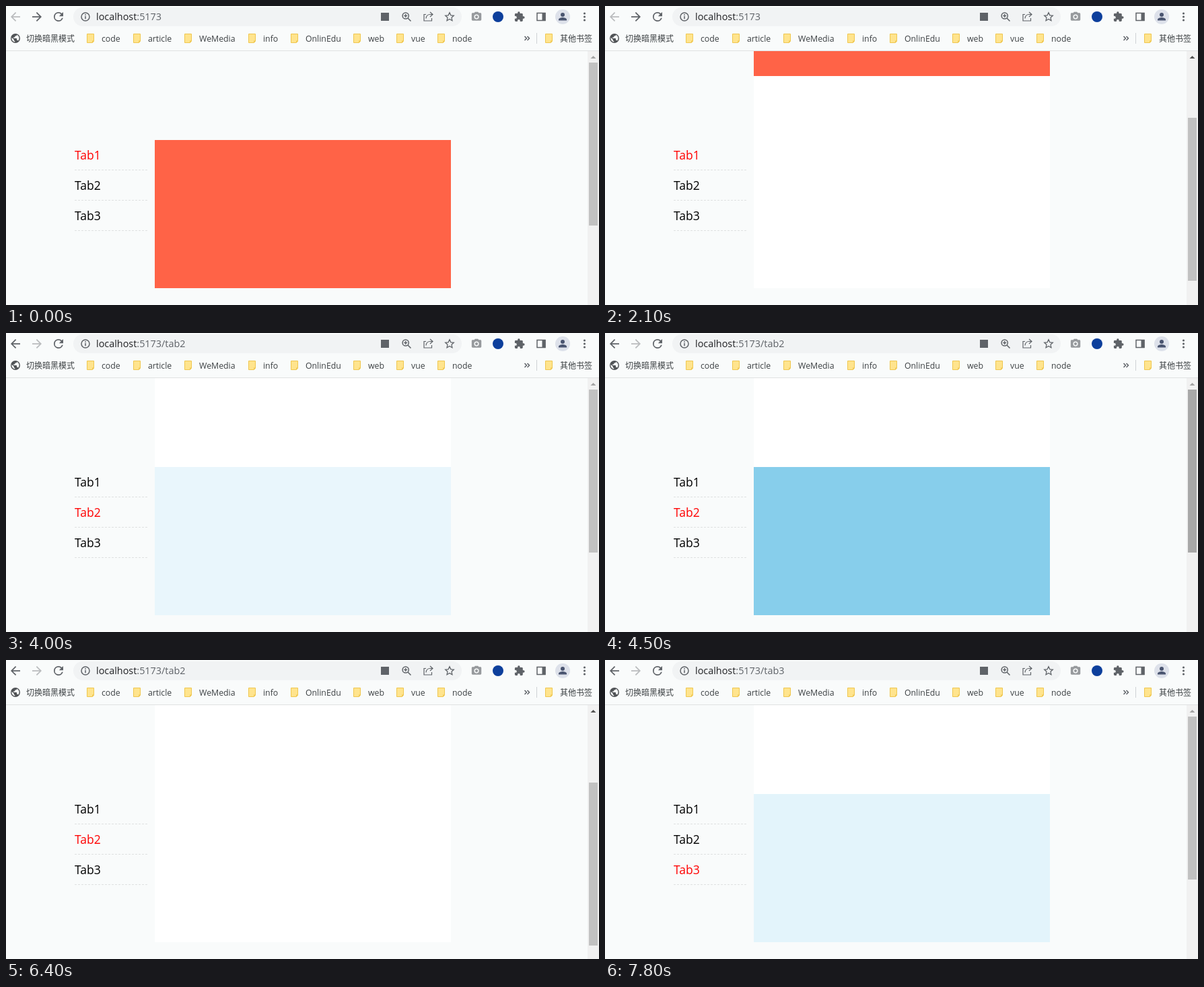
An HTML page that plays this animation: 881x444 px, repeating every 8 s.

```html
<!DOCTYPE html>
<html lang="zh">
<head>
<meta charset="utf-8">
<title>Tab scroll demo</title>
<style>
  html, body { margin: 0; width: 100%; height: 100%; overflow: hidden; background: #f9fbfb; }
  svg { display: block; width: 881px; height: 444px; }
  text { font-family: "Open Sans", "Noto Sans CJK SC", "Noto Sans CJK", sans-serif; }
  .url { font-size: 14.4px; fill: #5f6368; }
  .mark { font-size: 12.3px; fill: #3c4043; }
  .cjk { font-family: "Noto Sans CJK SC", "Noto Sans CJK", sans-serif; font-size: 12px; fill: #3c4043; }
  .tab { font-size: 17.5px; }
  .line { fill: none; stroke: #5f6368; stroke-width: 1.5; }
</style>
</head>
<body>
<svg viewBox="0 0 881 444">
  <rect width="881" height="444" fill="#f9fbfb"/>

  <!-- page -->
  <rect id="trail" x="221" width="440" fill="#fff"/>
  <rect id="panel" x="221" width="440" height="220"/>
  <g id="tabs"></g>
  <rect x="864" y="67" width="17" height="377" fill="#f1f1f1"/>
  <path id="arrow" d="M868.5 78h8l-4-4z"/>
  <rect id="thumb" x="866" width="13" height="242"/>

  <!-- toolbar -->
  <rect width="881" height="67" fill="#f9fbfb"/>
  <rect y="66" width="881" height="1" fill="#dfe1e2"/>
  <rect x="100" y="2" width="577" height="28" rx="14" fill="#f1f3f4"/>
  <path id="back" transform="translate(3.5 5.5) scale(.875)" d="M20 11H7.83l5.59-5.59L12 4l-8 8 8 8 1.41-1.41L7.83 13H20z"/>
  <path id="forward" transform="translate(56.5 5.5) scale(-.875 .875)" d="M20 11H7.83l5.59-5.59L12 4l-8 8 8 8 1.41-1.41L7.83 13H20z"/>
  <path transform="translate(67.5 5.5) scale(.875)" fill="#5f6368" d="M17.65 6.35A8 8 0 0 0 12 4a8 8 0 1 0 7.73 10h-2.08A6 6 0 1 1 12 6c1.66 0 3.14.69 4.22 1.78L13 11h7V4z"/>
  <circle cx="118" cy="16" r="6" class="line"/>
  <path d="M118 15v4.2M118 12.3v1.6" class="line"/>
  <text class="url" x="134" y="21"><tspan fill="#202124">localhost</tspan>:5173<tspan id="path"></tspan></text>

  <rect x="557" y="10" width="12" height="12" fill="#5f6368"/>
  <g class="line">
    <circle cx="593.7" cy="14.5" r="4.6"/>
    <path d="M597 18l4.5 4.5M591.2 14.5h5M593.7 12v5"/>
    <path d="M624 12.5h-3v9.5h11.5v-4M624 18.5c.5-4 3-6 6-6h3.500M630 9l4 3.500-4 3.500" stroke-width="1.200"/>
    <path d="M659 9.800l1.900 4 4.400.5-3.300 3 .9 4.400-3.900-2.200-3.900 2.200.9-4.400-3.300-3 4.400-.5z" stroke-width="1.300"/>
    <rect x="789" y="10.500" width="12" height="11"/>
  </g>
  <rect x="796.500" y="10" width="5" height="12" fill="#5f6368"/>
  <g transform="translate(690.400 7.400) scale(.72)" fill="#979a9d">
    <path fill-rule="evenodd" d="M9 2L7.170 4H4c-1.100 0-2 .9-2 2v12c0 1.100.9 2 2 2h16c1.100 0 2-.9 2-2V6c0-1.100-.9-2-2-2h-3.170L15 2zm3 15a5 5 0 1 1 0-10 5 5 0 0 1 0 10z"/>
    <circle cx="12" cy="12" r="3"/>
  </g>
  <circle cx="731" cy="16" r="8" fill="#0d3f9c"/>
  <path transform="translate(754.500 7.500) scale(.7)" fill="#5f6368" d="M20.500 11H19V7c0-1.100-.9-2-2-2h-4V3.500a2.500 2.500 0 0 0-5 0V5H4c-1.100 0-2 .9-2 2v3.800h1.500a2.700 2.700 0 0 1 0 5.400H2V20c0 1.100.9 2 2 2h3.800v-1.500a2.700 2.700 0 0 1 5.400 0V22H17c1.100 0 2-.9 2-2v-4h1.500a2.500 2.500 0 0 0 0-5z"/>
  <circle cx="827" cy="16" r="11" fill="#dde1ea"/>
  <g fill="#4a5570">
    <circle cx="827" cy="13" r="3"/>
    <path d="M821 21.500v-1.500c0-2 4-3 6-3s6 1 6 3v1.500z"/>
  </g>
  <g fill="#5f6368">
    <circle cx="859.500" cy="11" r="1.600"/>
    <circle cx="859.500" cy="16" r="1.600"/>
    <circle cx="859.500" cy="21" r="1.600"/>
  </g>

  <!-- bookmarks -->
  <path transform="translate(5.600 39.600) scale(.7)" fill="#505356" d="M12 2a10 10 0 1 0 0 20 10 10 0 0 0 0-20zm-1 17.930A8 8 0 0 1 4.210 10.210L9 15v1c0 1.100.9 2 2 2zm6.900-2.540c-.26-.81-1-1.390-1.900-1.390h-1v-3c0-.55-.45-1-1-1H8v-2h2c.55 0 1-.45 1-1V7h2c1.100 0 2-.9 2-2v-.41a8 8 0 0 1 2.900 12.800z"/>
  <text class="cjk" x="30" y="53">切换暗黑模式</text>
  <g id="marks"></g>
  <path d="M770.500 45l3 3-3 3M774.500 45l3 3-3 3" class="line" stroke-width="1.300"/>
  <rect x="788" y="40" width="1" height="16" fill="#cfd2d5"/>
  <text class="cjk" x="823" y="53">其他书签</text>
</svg>
<script>
const LOOP = 8000, STEP = 100;
const $ = id => document.getElementById(id);
const set = (el, attrs) => { for (const k in attrs) el.setAttribute(k, attrs[k]); };

// Each run: start time, then one value per step.
const dragRuns = [
  [0, 0],
  [700, 6, 14, 24, 36, 47, 55, 60],
  [1500, 63, 67, 71, 75, 79, 82],
  [3000, 0],
  [4900, 8, 22, 38, 53, 66, 76, 82, 86, 90, 94],
  [6100, 95, 96, 98],
  [7400, 0]
];
const fadeRuns = [
  [0, 1],
  [3000, .95, .75, .5, .3, .12, 0],
  [3800, .06],
  [4000, .18, .4, .66, .87],
  [4500, 1],
  [7400, .95, .8, .6, .4, .23]
];
const thumbRuns = [
  [0, '#c1c1c1'], [300, '#a8a8a8'], [700, '#787878'], [2100, '#c1c1c1'],
  [4200, '#a8a8a8'], [4700, '#787878'], [6400, '#c1c1c1']
];

function valueAt(runs, t) {
  const [start, ...values] = runs.filter(r => r[0] <= t).pop();
  return values[Math.min(values.length - 1, Math.floor((t - start) / STEP))];
}

const folder = x => `<path d="M${x + .5} 41.500h10v11l-2 2h-8z" fill="#ffe48d" stroke="#efc64f"/>
  <path d="M${x + 10.500} 51.500h-2.500v3z" fill="#efc64f"/>`;

const marks = { code: 120, article: 189, WeMedia: 265, info: 360, OnlinEdu: 423, web: 516, vue: 580, node: 641 };
$('marks').innerHTML = folder(801) + Object.entries(marks).map(([name, x]) =>
  `${folder(x)}<text class="mark" x="${x + 22}" y="53">${name}</text>`).join('');

$('tabs').innerHTML = [1, 2, 3].map(n => {
  const y = 183 + 45 * n;
  return `<text class="tab" x="102" y="${y}">Tab${n}</text>
    <path d="M102 ${y + 15.500}h110" stroke="#dfe1e1" stroke-dasharray="3 2"/>`;
}).join('');
const labels = document.querySelectorAll('.tab');

function draw(t) {
  const tab = t < 3000 ? 1 : t < 7400 ? 2 : 3;
  const drag = valueAt(dragRuns, t);
  const top = 199 - Math.round(drag * 3.838);
  const trailTop = tab === 1 ? Math.max(67, top) : 67;

  set($('trail'), { y: trailTop, height: 419 - trailTop });
  set($('panel'), { y: top, fill: t < 3600 ? '#ff6347' : '#87ceeb', opacity: valueAt(fadeRuns, t) });
  set($('thumb'), { y: 84 + drag, fill: valueAt(thumbRuns, t) });
  set($('arrow'), { fill: drag ? '#505050' : '#a3a3a3' });
  set($('back'), { fill: tab === 1 ? '#babcbe' : '#5f6368' });
  set($('forward'), { fill: tab === 1 ? '#5f6368' : '#babcbe' });
  $('path').textContent = tab === 1 ? '' : '/tab' + tab;
  labels.forEach((el, i) => set(el, { fill: i + 1 === tab ? '#f00' : '#000' }));
}

const begin = performance.now();
function tick() {
  draw((performance.now() - begin) % LOOP);
  requestAnimationFrame(tick);
}
tick();
</script>
</body>
</html>
```
